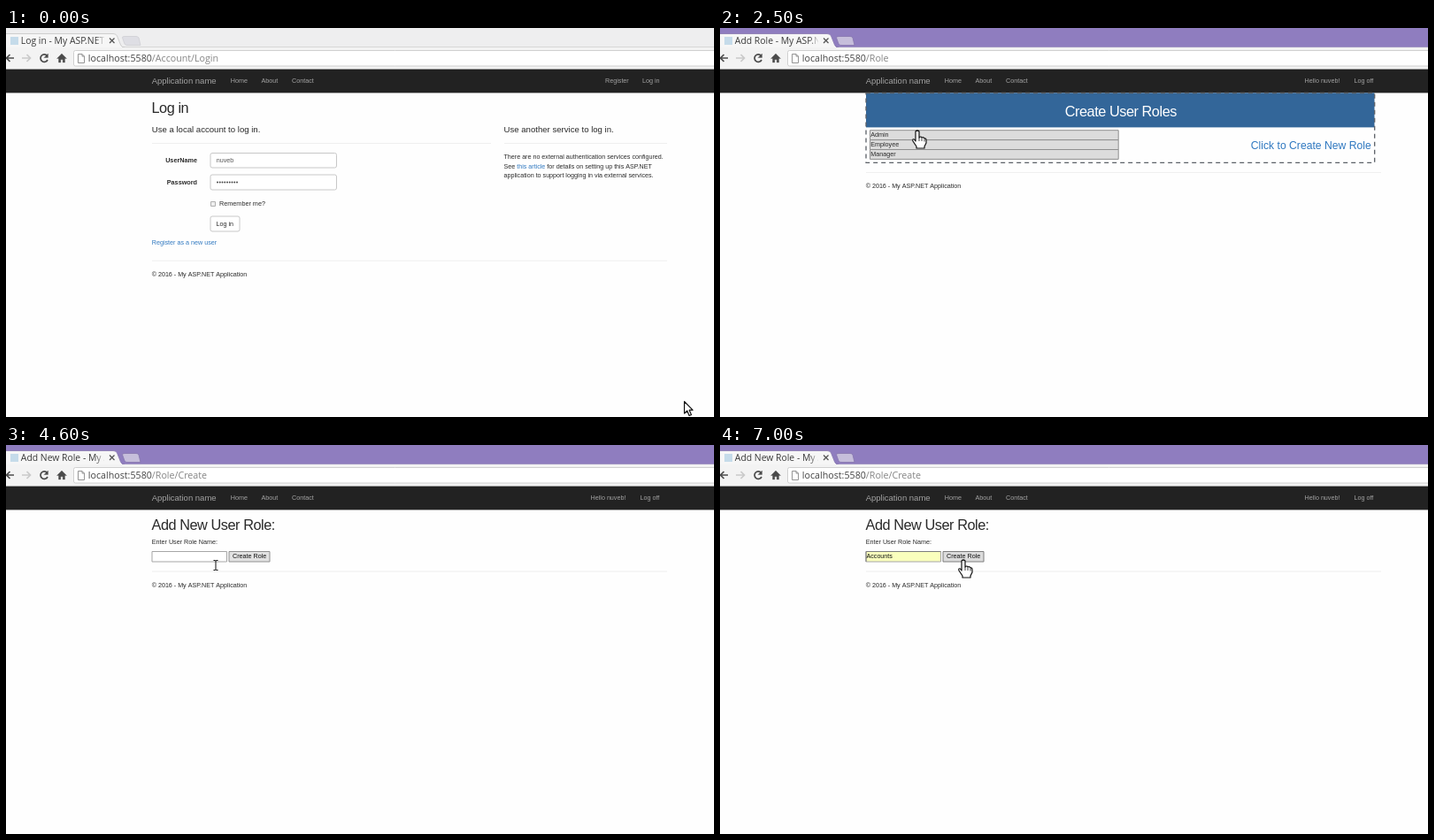
These frames come from a looping animation (800x440 px, 7100 ms). An HTML page with a canvas:

```html
<!DOCTYPE html>
<html lang="en">
<head>
<meta charset="utf-8">
<title>User roles walkthrough</title>
<style>
html, body { margin: 0; width: 100%; height: 100%; overflow: hidden; background: #fff; }
canvas { display: block; width: 800px; height: 440px; }
</style>
</head>
<body>
<canvas id="stage" width="800" height="440"></canvas>
<script>
const ctx = document.getElementById('stage').getContext('2d');
const LOOP = 7100, STEP = 100;
const PAGE = '"Liberation Sans", Arial, sans-serif';
const UI = '"Open Sans", "Noto Sans", sans-serif';
const USER = 'nuveb';
const HOST = 'localhost:5580';
const LINK = '#2f78c0', INK = '#2a2a2a';

// start time, page, address path, tab title, still loading
const STATES = [
  [0, 'login', '/Account/Login', 'Log in - My ASP.NET Application'],
  [1100, 'login', '/Account/Login', HOST + '/Account/Login', true],
  [1500, 'home', '/Users', 'Index - My ASP.NET Application'],
  [2400, 'home', '/Role', HOST + '/Role', true],
  [2500, 'roles', '/Role', 'Add Role - My ASP.NET Application'],
  [3800, 'roles', '/Role/Create', HOST + '/Role/Create', true],
  [4000, 'create', '/Role/Create', 'Add New Role - My ASP.NET Application']
];

// time, x, y, pointer shape from then on
const POINTER = [
  [0, 766, 422, 'arrow'], [100, 766, 422, 'arrow'], [800, 251, 217, 'hand'],
  [1500, 251, 217, 'arrow'], [1600, 250, 212, 'arrow'], [2200, 223, 116, 'hand'],
  [2600, 223, 116, 'arrow'], [3400, 648, 133, 'hand'], [3800, 648, 133, 'arrow'],
  [4100, 648, 133, 'arrow'], [4500, 237, 136, 'beam'], [4700, 237, 136, 'beam'],
  [4800, 252, 140, 'arrow'], [4900, 203, 141, 'arrow'], [5800, 203, 141, 'arrow'],
  [6200, 202, 157.5, 'arrow'], [6500, 202, 157.5, 'arrow'], [6900, 275, 130, 'hand'],
  [LOOP, 275, 130, 'hand']
];

const SHAPES = {
  arrow: new Path2D('M.5 .5V14L3.7 11L6 16.5L8.4 15.5L6.1 10.2H10Z'),
  hand: new Path2D('M-2 1Q0 -1 2 1V8Q4 6 5 8Q7 7 8 9Q10 8.5 10 11V14L8 18V20H-1V18L-5 12Q-6 9 -3.5 10L-2 12Z'),
  beam: new Path2D('M-2.5 -5.5H-.8L0 -5L.8 -5.5H2.5M0 -5V5M-2.5 5.5H-.8L0 5L.8 5.5H2.5')
};

function text(str, x, y, size = 7.15, color = INK, { font = PAGE, weight = '', align = 'left', spacing = 0 } = {}) {
  ctx.font = `${weight} ${size}px ${font}`;
  ctx.letterSpacing = `${spacing}px`;
  ctx.fillStyle = color;
  ctx.textAlign = align;
  ctx.fillText(str, x, y);
  return ctx.measureText(str).width;
}

const heading = (str, x, y, color, align) => text(str, x, y, 16.3, color, { align, spacing: -0.45 });

function rect(x, y, w, h, fill) {
  ctx.fillStyle = fill;
  ctx.fillRect(x, y, w, h);
}

function box(x, y, w, h, fill, stroke, radius = 0) {
  ctx.beginPath();
  ctx.roundRect(x, y, w, h, radius);
  ctx.fillStyle = fill;
  ctx.fill();
  ctx.strokeStyle = stroke;
  ctx.lineWidth = 1;
  ctx.stroke();
}

function dot(x, y, r, fill) {
  ctx.beginPath();
  ctx.arc(x, y, r, 0, 7);
  ctx.fillStyle = fill;
  ctx.fill();
}

function path(d, color, width = 1, fill) {
  const p = typeof d === 'string' ? new Path2D(d) : d;
  if (fill) { ctx.fillStyle = fill; ctx.fill(p); }
  ctx.strokeStyle = color;
  ctx.lineWidth = width;
  ctx.stroke(p);
}

const rule = (x1, x2, y) => rect(x1, y, x2 - x1, 1, '#efefef');

function footer(y) {
  rule(165, 747, y - 18.3);
  text('© 2016 - My ASP.NET Application', 164.7, y);
}

function pointerAt(t) {
  let i = 0;
  while (i < POINTER.length - 2 && POINTER[i + 1][0] <= t) i++;
  const [t0, x0, y0, shape] = POINTER[i], [t1, x1, y1] = POINTER[i + 1];
  const u = (t - t0) / (t1 - t0), k = u * u * (3 - 2 * u);
  return { x: x0 + (x1 - x0) * k, y: y0 + (y1 - y0) * k, shape };
}

function drawBrowser(t, [, , url, title, loading]) {
  const active = t >= 900;
  const edge = active ? '#8878b0' : '#c6c6c6';
  rect(0, 0, 800, 22, active ? '#8f7dbf' : '#eeeeef');
  path('M134 9.5H147Q149 9.5 150 11L152 19.5H137Q135 19.5 134 18L131.5 11Q131 9.5 134 9.5Z',
    active ? '#8474ad' : '#cfcfd3', 0.8, active ? '#c6bedb' : '#dedee4');
  rect(0, 21, 800, 1, active ? '#a196c2' : '#d6d6d6');
  path('M-2 6.5H121Q124.5 6.5 125.5 9L129.5 19Q130.5 22 134 22H-2Z', edge, 0.8, '#f6f6f6');
  rect(0, 21, 131, 2, '#f6f6f6');
  rect(0, 22, 800, 25, '#f3f3f3');

  if (loading) {
    const a = t / 160;
    ctx.beginPath();
    ctx.arc(9, 14, 4, a, a + 1.6);
    ctx.strokeStyle = '#a9b3bf';
    ctx.lineWidth = 1.2;
    ctx.stroke();
  } else {
    rect(5, 10, 9, 9, '#c5dbea');
  }
  ctx.save();
  ctx.beginPath();
  ctx.rect(16, 6, 95, 16);
  ctx.clip();
  const fade = ctx.createLinearGradient(101, 0, 112, 0);
  fade.addColorStop(0, '#3a3a3a');
  fade.addColorStop(1, '#3a3a3a00');
  text(title, 16.8, 18, 10.4, fade, { font: UI });
  ctx.restore();
  path('M117 11.5L122.5 17M122.5 11.5L117 17', '#555', 1.3);

  path('M9 34H1M4.5 30L.5 34L4.5 38', '#4d4d4d', 1.7);
  path('M18 34H27M23.5 30L27.5 34L23.5 38', '#cacaca', 1.7);
  if (loading) {
    path('M39 30L47 38M47 30L39 38', '#4a4a4a', 2);
  } else {
    path('M46.5 31.5A4.2 4.2 0 1 0 47 36', '#4a4a4a', 1.7);
    path('M47.5 29V33.5H43Z', '#4a4a4a', 0.3, '#4a4a4a');
  }
  path('M57.5 34.5L63 29L68.5 34.5H66.5V39H64.2V35.8H61.8V39H59.5V34.5Z', '#4a4a4a', 0.3, '#4a4a4a');

  box(76.5, 25.5, 730, 17.5, '#fff', '#d0d0d0', 2);
  path('M81.5 29.5H86L88.5 32V39.5H81.5ZM86 29.5V32H88.5', '#888', 0.9, '#fff');
  const w = text(HOST, 92.8, 38, 10.7, '#444', { font: UI });
  text(url, 92.8 + w, 38, 10.7, '#858585', { font: UI });
}

function drawNav(signedIn) {
  rect(0, 46.6, 800, 26.8, '#222');
  const gray = '#a3a3a3';
  const item = (str, x) => text(str, x, 61.8, 7.2, gray);
  text('Application name', 164.7, 62.5, 9.5, gray);
  item('Home', 253.7);
  item('About', 288.5);
  item('Contact', 323);
  if (signedIn) {
    item(`Hello ${USER}!`, 660.5);
    item('Log off', 716.5);
  } else {
    item('Register', 677);
    item('Log in', 719);
  }
}

function drawLogin(t) {
  heading('Log in', 164.5, 96.3);
  text('Use a local account to log in.', 164.7, 118, 9.6);
  text('Use another service to log in.', 562.5, 118, 9.6);
  rule(165, 548, 130);
  rule(563, 747, 130);

  const label = { weight: 'bold', align: 'right' };
  text('UserName', 216, 152, 7.25, INK, label);
  text('Password', 216, 176.5, 7.25, INK, label);
  box(231, 141.5, 142.5, 16.5, '#fff', '#c8c8c8', 2);
  box(231, 166, 142.5, 17, '#fff', '#c8c8c8', 2);
  text(USER, 237.8, 152, 7.15, '#555');
  for (let i = 0; i < 9; i++) dot(239 + i * 2.75, 174.5, 0.95, '#444');
  box(231.5, 196.5, 5, 5, '#eee', '#b0b0b0');
  text('Remember me?', 241, 201.2, 7.25);
  const over = t >= 800;
  box(231, 213, 33, 17, over ? '#e4e4e4' : '#fff', over ? '#999' : '#c8c8c8', 2);
  text('Log in', 237.5, 223.5);
  text('Register as a new user', 164.7, 245, 7.2, LINK);

  text('There are no external authentication services configured.', 562.5, 148.2);
  let x = 562.5;
  x += text('See ', x, 158.6);
  x += text('this article', x, 158.6, 7.15, LINK);
  text(' for details on setting up this ASP.NET', x, 158.6);
  text('application to support logging in via external services.', 562.5, 168.8);
  footer(281);
}

function drawHome() {
  text('Welcome Admin. Now you can create user Role.', 164.5, 99.5, 19.4, INK, { spacing: -0.45 });
  dot(169, 120.5, 1.9, INK);
  text('Manage Role', 176, 124.5, 12.2, LINK);
  footer(155.5);
}

function drawRoles(t) {
  rect(165, 73.4, 574.5, 39, '#336699');
  heading('Create User Roles', 452.8, 100.3, '#fff', 'center');
  ctx.setLineDash([5, 4]);
  path('M165 73.5H739.7V152.3H165Z', '#5a5f66', 1.3);
  ctx.setLineDash([]);
  ['Admin', 'Employee', 'Manager'].forEach((role, i) => {
    box(169.5, 115.7 + i * 10.9, 280.7, 10.9, '#dcdcdc', '#8f8f8f');
    text(role, 170.2, 123.2 + i * 10.9, 7.2);
  });
  const over = t >= 3400;
  const color = over ? '#23609f' : LINK;
  const w = text('Click to Create New Role', 599.7, 137.2, 12.2, color);
  if (over) rect(599.7, 138.7, w, 1, color);
  footer(181.2);
}

function drawCreate(t, pointer) {
  const open = t >= 5500 && t < 6500;
  const done = t >= 6500;
  const focused = t >= 4700 && t < 7000;
  const pressed = t >= 7000;
  heading('Add New User Role:', 164.5, 96.3);
  text('Enter User Role Name:', 164.7, 112, 7.2);
  footer(160.8);

  const hovered = !open || t < 5900 ? -1 : pointer.y < 149.5 ? 0 : 1;
  const filled = done || hovered >= 0;
  box(165, 120.5, 84.5, 11.5, filled ? '#faffbd' : '#fff', focused ? '#8fa3bd' : '#a6a6a6');
  if (pressed) path('M165 132V120.5H249.5', '#7d7d7d', 1);
  box(252, 120.5, 46, 11.5, pressed ? '#dcdcdc' : '#e2e2e2', pressed ? '#7d7d7d' : '#8f8f8f');
  text('Create Role', 256, 128.4, 7.2, '#111');

  const roles = ['Admin', 'Accounts', 'Acounts'];
  if (done) {
    text('Accounts', 165.5, 128.4, 7.15, '#111');
  } else if (open) {
    const w = text('A', 165.5, 128.4, 7.15, '#111');
    if (hovered >= 0) {
      const rest = roles[hovered].slice(1);
      const x = 165.5 + w;
      rect(x, 121.8, ctx.measureText(rest).width, 8.7, '#3390ff');
      text(rest, x, 128.4, 7.15, '#fff');
    }
  } else if (t >= 4700 && t < 5200) {
    rect(166, 122, 0.8, 8.5, '#222');
  }

  if (open) {
    box(165, 133.5, 84.5, 49, '#fff', '#b3b3b3');
    if (hovered >= 0) rect(165.5, 133.8 + hovered * 16.2, 83.5, 16, '#cbcbcb');
    roles.forEach((role, i) => text(role, 167, 145 + i * 16.2, 10, '#222', { font: UI }));
  }
}

function drawPointer({ x, y, shape }) {
  ctx.save();
  ctx.translate(x, y);
  ctx.lineJoin = 'round';
  path(SHAPES[shape], '#111', shape === 'beam' ? 1 : 1.2, shape === 'beam' ? null : '#fff');
  if (shape === 'hand') path('M2 8V12M5 8.5V12M8 9.5V12.5', '#111', 0.8);
  ctx.restore();
}

const PAGES = { login: drawLogin, home: drawHome, roles: drawRoles, create: drawCreate };

function draw(t) {
  const state = STATES.filter(s => s[0] <= t).pop();
  const pointer = pointerAt(t);
  rect(0, 0, 800, 440, '#fefefe');
  drawBrowser(t, state);
  drawNav(state[1] !== 'login');
  PAGES[state[1]](t, pointer);
  drawPointer(pointer);
}

const start = performance.now();
function tick() {
  const t = (performance.now() - start) % LOOP;
  draw(Math.floor(t / STEP) * STEP);
  requestAnimationFrame(tick);
}
tick();
</script>
</body>
</html>
```
